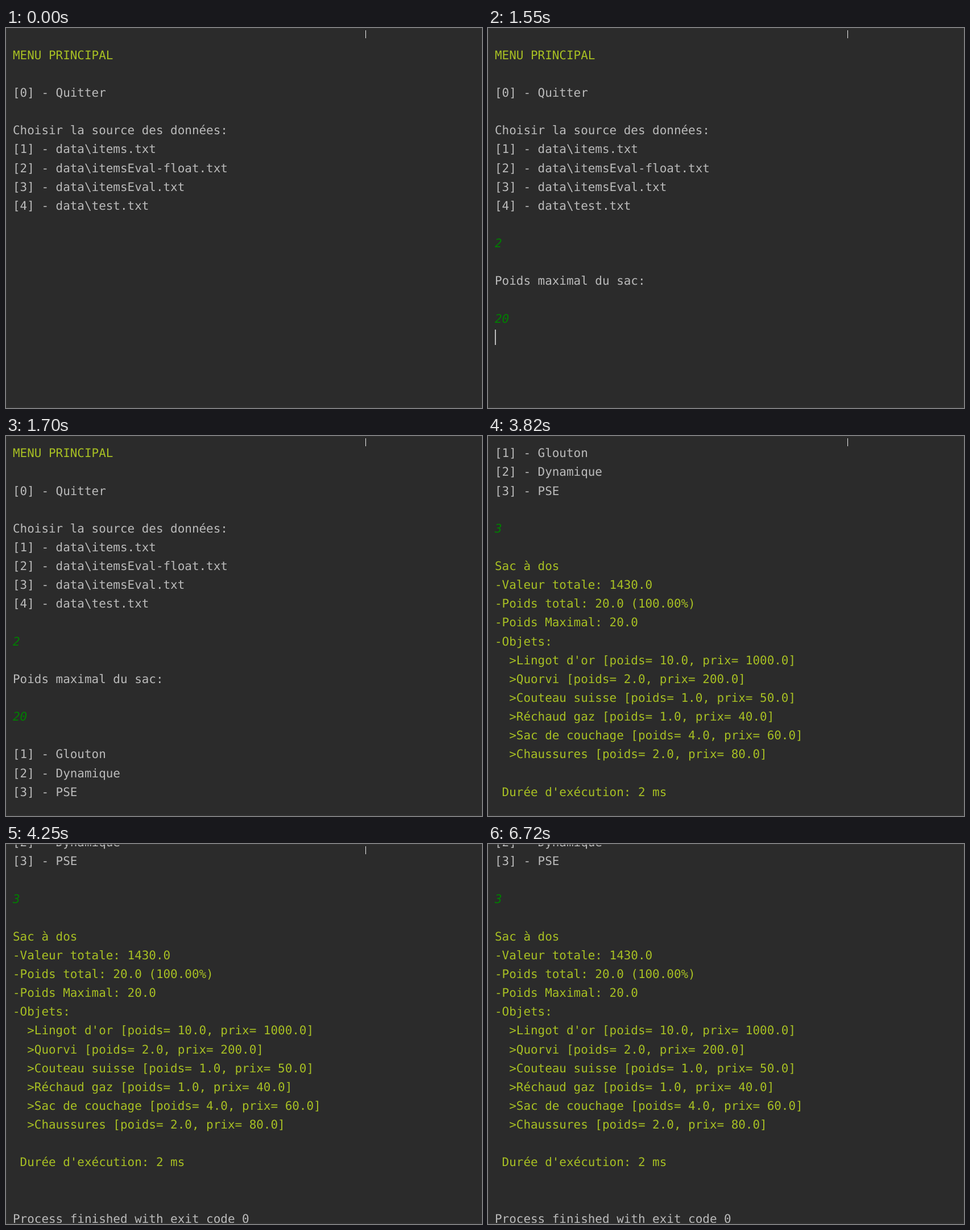
Animation, 837 px wide and 669 px high, one loop 6.87 s. Source, as an HTML page:

```html
<!DOCTYPE html>
<html lang="fr">
<head>
<meta charset="utf-8">
<style>
  html, body { margin: 0; width: 100%; height: 100%; overflow: hidden; background: #2b2b2b; }
  svg { display: block; }
  text {
    font: 20.93px "DejaVu Sans Mono", monospace;
    text-rendering: geometricPrecision;
    white-space: pre;
    fill: #bbb;
  }
  .result { fill: #a8c023; }
  .input { fill: #007f00; font-style: italic; }
</style>
</head>
<body>
<svg width="837" height="669" viewBox="0 0 837 669">
  <clipPath id="view"><rect x="1" y="1" width="835" height="666"/></clipPath>
  <rect width="837" height="669" fill="#323232"/>
  <rect x="1" y="1" width="835" height="666" fill="#2b2b2b"/>
  <g id="page" clip-path="url(#view)"></g>
  <rect id="pointer" width="1" height="14" fill="#eee"/>
</svg>
<script>
const LOOP = 6870, ROW = 33.13, COL = 12.6, LEFT = 12, BASE = 37.3, CARET_RISE = 21;
const page = document.getElementById('page');
const pointer = document.getElementById('pointer');
const lines = [];

function add(tag, attrs) {
  const el = document.createElementNS('http://www.w3.org/2000/svg', tag);
  for (const name in attrs) el.setAttribute(name, attrs[name]);
  return page.appendChild(el);
}

// One string per console row; each block appears at its start time.
function print(start, firstRow, style, ...rows) {
  rows.forEach((content, i) => {
    if (!content) return;
    const el = add('text', { class: style });
    el.textContent = content;
    lines.push({ el, start, row: firstRow + i });
  });
}

print(0, 0, 'result', 'MENU PRINCIPAL');
print(0, 2, '', '[0] - Quitter', '', 'Choisir la source des données:',
  '[1] - data\\items.txt', '[2] - data\\itemsEval-float.txt',
  '[3] - data\\itemsEval.txt', '[4] - data\\test.txt');
print(150, 10, 'input', '2');
print(430, 12, '', 'Poids maximal du sac:');
print(990, 14, 'input', '2');
print(1140, 14, 'input', ' 0');
print(1700, 16, '', '[1] - Glouton', '[2] - Dynamique', '[3] - PSE');
print(3540, 20, 'input', '3');
print(3820, 22, 'result', 'Sac à dos', '-Valeur totale: 1430.0',
  '-Poids total: 20.0 (100.00%)', '-Poids Maximal: 20.0', '-Objets:',
  "  >Lingot d'or [poids= 10.0, prix= 1000.0]",
  '  >Quorvi [poids= 2.0, prix= 200.0]',
  '  >Couteau suisse [poids= 1.0, prix= 50.0]',
  '  >Réchaud gaz [poids= 1.0, prix= 40.0]',
  '  >Sac de couchage [poids= 4.0, prix= 60.0]',
  '  >Chaussures [poids= 2.0, prix= 80.0]',
  '', " Durée d'exécution: 2 ms");
print(4250, 37, '', 'Process finished with exit code 0');

const caret = add('rect', { width: 2, height: 27, fill: '#bbb' });

// [time, scroll offset in px]
const scrolls = [[0, -17.5], [1700, 0], [3540, ROW], [3820, 16 * ROW], [4250, 18 * ROW]];
// [time, row, column]; no row means hidden
const carets = [[0], [150, 10, 1], [430, 14, 0], [990, 14, 1], [1140, 14, 2], [1550, 15, 0], [1700]];
// [time, x, y]; no x means hidden
const pointers = [[0, 632, 4], [5910, 646, 40], [6030, 606, 105], [6180, 555, 175],
  [6310, 508, 238], [6460, 481, 243], [6600, 447, 233], [6720]];

const at = (steps, t) => steps.filter(step => step[0] <= t).pop();

function place(el, shown, x, y) {
  el.setAttribute('visibility', shown ? 'visible' : 'hidden');
  if (!shown) return;
  el.setAttribute('x', x);
  el.setAttribute('y', y);
}

function draw(now) {
  const t = now % LOOP;
  const [, scroll] = at(scrolls, t);
  const baseline = row => Math.round(BASE + row * ROW - scroll);
  for (const { el, start, row } of lines) place(el, t >= start, LEFT, baseline(row));

  const [, row, col] = at(carets, t);
  place(caret, row !== undefined, Math.floor(LEFT + col * COL), baseline(row) - CARET_RISE);

  const [, x, y] = at(pointers, t);
  place(pointer, x !== undefined, x, y);
  requestAnimationFrame(draw);
}
draw(performance.now());
</script>
</body>
</html>
```
